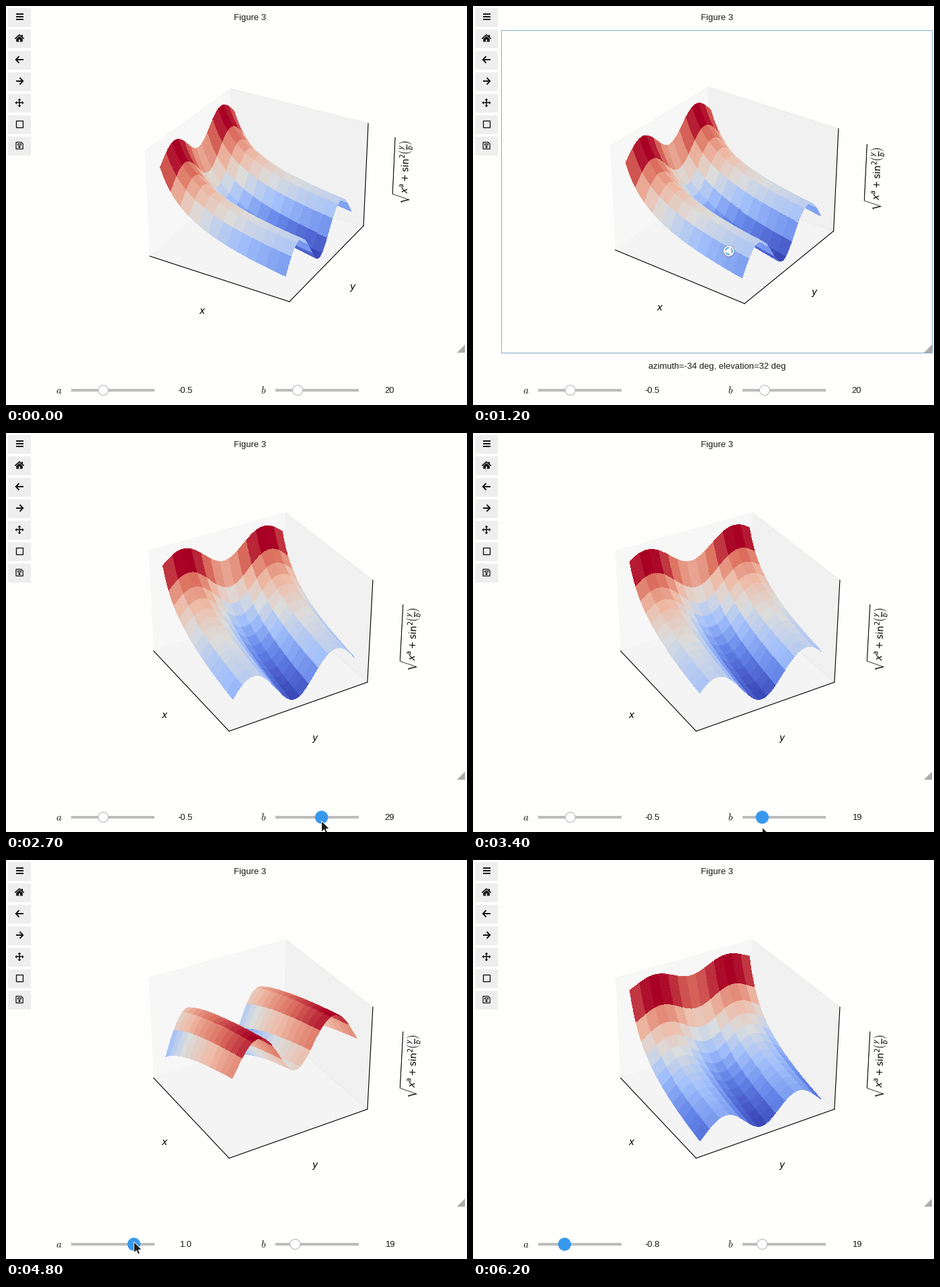
Animation of 686x595 px, one loop 6.6 s. Source, as a matplotlib script:

```python
import numpy as np
import matplotlib.pyplot as plt
from matplotlib.animation import FuncAnimation
from matplotlib.colors import LinearSegmentedColormap
from matplotlib.patches import Circle, Polygon, Rectangle
from matplotlib.transforms import Affine2D

W, H, DPI = 686, 595, 100
STEP, LOOP = 100, 6600
PX = 72 / DPI
INK, GRAY, BLUE = "#151515", "#bcbcbc", "#3898ec"
BLOCKS, FINE = 13, 3
PLOT_LAG, VIEW_LAG = 200, 350
COOLWARM = LinearSegmentedColormap.from_list(
    "warm", ["#3b48b8", "#6384e8", "#a2c0fb", "#dbdddd",
             "#eebba6", "#dd7462", "#a80024"])

fig = plt.figure(figsize=(W / DPI, H / DPI), dpi=DPI, facecolor="#fefefd")


# --- motion -----------------------------------------------------------

def linear(t, t0, t1):
    return np.clip((t - t0) / (t1 - t0), 0, 1)


def ease(t, t0, t1):
    s = linear(t, t0, t1)
    return s * s * (3 - 2 * s)


def a_at(t):
    return (-0.52 + 1.52 * ease(t, 4220, 4740)
            - 1.65 * ease(t, 5060, 5620) - 0.15 * ease(t, 5600, 6000))


def b_at(t):
    return 20 + 12 * ease(t, 2400, 2850) - 12.9 * ease(t, 2870, 3400)


def knob_a(t):
    return 160.3 + 30 * a_at(t)


def knob_b(t):
    return 434 + 4 * (b_at(t) - 20)


def view_at(t):
    """Azimuth and elevation produced by the mouse drag."""
    s = ease(t, 650, 1350) * 180 / 369.6
    return -60 + 60.5 * s, 30 + 5 * s


def cursor_at(t):
    if t < 2300:
        reach, drag = ease(t, 400, 600), ease(t, 650, 1350)
        back, leave = ease(t, 1400, 1700), ease(t, 1700, 2300)
        return (440 - 6 * reach - 60.5 * drag + 12.5 * back + 48 * leave,
                556 - 195 * reach + 5 * drag - 2 * back + 209 * leave)
    if t < 3850:
        away = linear(t, 3400, 3800)
        return knob_b(t) - 230 * away, 573 + 15 * linear(t, 2300, 3400) + 17 * away
    arrive = ease(t, 3800, 4100)
    return knob_a(t), 600 - 32 * arrive + 40 * linear(t, 4500, 6100) ** 2


# --- 3D plot inside a 640 x 480 canvas --------------------------------

ax = fig.add_axes([123 / W, 130.8 / H, 496 / W, 369.6 / H], projection="3d")
ax.patch.set_visible(False)
n = BLOCKS * FINE + 1
X, Y = np.meshgrid(np.linspace(0.1, 1, n), np.linspace(-50, 50, n))
ax.set(xticks=[], yticks=[], zticks=[], xlabel="$x$", ylabel="$y$",
       zlabel=r"$\sqrt{x^{a} + \mathrm{sin}^{2}{\left(\frac{y}{b}\right)}}$")


def padded(lo, hi, margin=0.0):
    lo, hi = lo - margin * (hi - lo), hi + margin * (hi - lo)
    d = (hi - lo) / 48
    return lo - d, hi + d


def block_colors(Z):
    """One colour per block of cells, from the mean height."""
    cells = (Z[1:, 1:] + Z[1:, :-1] + Z[:-1, 1:] + Z[:-1, :-1]) / 4
    mean = cells.reshape(BLOCKS, FINE, BLOCKS, FINE).mean(axis=(1, 3))
    mean = (mean - mean.min()) / np.ptp(mean)
    return COOLWARM(np.kron(mean, np.ones((FINE, FINE))))


surface = None


def draw_surface(a, b):
    global surface
    if surface is not None:
        surface.remove()
    Z = np.sqrt(X ** a + np.sin(Y / b) ** 2)
    surface = ax.plot_surface(X, Y, Z, rstride=1, cstride=1, shade=False,
                              facecolors=block_colors(Z), linewidth=0,
                              antialiased=False)
    ax.set_xlim(*padded(0.1, 1, 0.05))
    ax.set_ylim(*padded(-50, 50, 0.05))
    ax.set_zlim(*padded(Z.min(), Z.max()))


# --- overlay in pixel coordinates, y pointing down --------------------

ui = fig.add_axes([0, 0, 1, 1], zorder=5)
ui.set(xlim=(0, W), ylim=(H, 0))
ui.set_autoscale_on(False)
ui.axis("off")


def rect(x, y, w, h, fc=INK, ec="none", lw=0):
    return ui.add_patch(Rectangle((x, y), w, h, fc=fc, ec=ec, lw=lw * PX))


def poly(pts, fc=INK, ec="none", lw=0, **kw):
    return ui.add_patch(Polygon(pts, closed=True, fc=fc, ec=ec, lw=lw * PX, **kw))


def disc(x, y, r, fc=INK, ec="none", lw=0, **kw):
    return ui.add_patch(Circle((x, y), r, fc=fc, ec=ec, lw=lw * PX, **kw))


def line(pts, lw=2, color=INK, **kw):
    x, y = zip(*pts)
    return ui.plot(x, y, color=color, lw=lw * PX, solid_capstyle="butt",
                   solid_joinstyle="miter", **kw)[0]


def label(x, y, s, size=13, **kw):
    return ui.text(x, y, s, fontsize=size * PX, color="#1a1a1a", ha="center",
                   va="baseline", family="Liberation Sans", **kw)


def arrow_icon(cy, d):
    line([(20 - 5.5 * d, cy), (20 + 4.5 * d, cy)])
    line([(20 + 0.5 * d, cy - 5), (20 + 5.2 * d, cy), (20 + 0.5 * d, cy + 5)])


def home_icon(cy):
    line([(13.3, cy + 0.8), (20, cy - 5), (26.7, cy + 0.8)], 1.7)
    rect(23.3, cy - 5.2, 1.9, 4)
    poly([(15.2, cy + 1), (20, cy - 3), (24.8, cy + 1), (24.8, cy + 5.4),
          (15.2, cy + 5.4)])
    rect(18.7, cy + 2, 2.6, 3.4, fc="#eeeeee")


def pan_icon(cy):
    for k in range(4):
        turn = Affine2D().rotate_deg(90 * k).translate(20, cy) + ui.transData
        line([(0, 0), (5, 0)], 1.6, transform=turn)
        poly([(6.6, 0), (3.9, -2.6), (3.9, 2.6)], transform=turn)


def save_icon(cy):
    poly([(15, cy - 5), (22.6, cy - 5), (25.2, cy - 2.4), (25.2, cy + 5),
          (15, cy + 5)], fc="none", ec=INK, lw=1.3)
    rect(16.8, cy - 3.6, 5.4, 2.6, fc="none", ec=INK, lw=1)
    disc(20, cy + 2, 1.6)


for k in range(7):
    rect(3, 3 + 32 * k, 34, 28, fc="#eeeeee")
for k in range(3):
    rect(14.5, 11 + 4.2 * k, 11, 2)
home_icon(48)
arrow_icon(80, -1)
arrow_icon(112, 1)
pan_icon(144.3)
rect(15, 171.3, 10, 10, fc="none", ec=INK, lw=1.4)
save_icon(208.2)

label(363, 21, "Figure 3")
message = label(363, 541, "")
border = [rect(x, y, w, h, fc="#7db0cc") for x, y, w, h in
          ((42, 36, 642, 1), (42, 517, 642, 1), (42, 36, 1, 482), (683, 36, 1, 482))]
poly([(683, 505), (683, 517), (671, 517)], fc="#ababab")


class Slider:
    def __init__(self, x, name):
        label(x - 18, 577.5, f"${name}$", 15, math_fontfamily="cm")
        rect(x, 571, 124, 4, fc=GRAY)
        self.knob = disc(x, 573, 7.5, lw=1, zorder=3)
        self.value = label(x + 170, 577, "")

    def set(self, x, text, active):
        self.knob.set_center((x, 573))
        self.knob.set_radius(9.2 if active else 7.5)
        self.knob.set_facecolor(BLUE if active else "white")
        self.knob.set_edgecolor(BLUE if active else "#b4b4b4")
        self.value.set_text(text)


slider_a, slider_b = Slider(97, "a"), Slider(401, "b")

# Mouse pointers, drawn around their hot spot
shift = Affine2D()
at_mouse = dict(transform=shift + ui.transData, zorder=6)
pointer = poly([(0, 0), (0, 16.5), (3.8, 13), (6.3, 18.5), (9, 17.3),
                (6.6, 12), (11.7, 11.5)], "#1c1c1c", "white", 0.9, **at_mouse)
grip = [disc(0, 0.6, 9, "#00000022", **at_mouse),
        disc(0, 0, 8, "white", "#a5abb0", 1, **at_mouse)]
for k in range(3):
    ang = np.radians(np.linspace(0, 85, 12) + 120 * k - 50)
    grip.append(line(list(zip(5 * np.cos(ang), 5 * np.sin(ang))), 2,
                     "#5aa5d6", **at_mouse))


def update(i):
    t = i * STEP
    draw_surface(a_at(t - PLOT_LAG), b_at(t - PLOT_LAG))
    azim, elev = view_at(t - VIEW_LAG)
    ax.view_init(elev=elev, azim=azim)

    slider_a.set(knob_a(t), f"{round(a_at(t), 1) + 0:.1f}", t >= 4100)
    slider_b.set(knob_b(t), f"{b_at(t):.0f}", 2200 <= t < 3800)

    x, y = cursor_at(t)
    shift.clear().translate(x, y)
    shown, dragging = t >= 400, 700 <= t <= 1500
    pointer.set_visible(shown and not dragging)
    for part in grip:
        part.set_visible(dragging)

    hover = shown and y < 518
    for side in border:
        side.set_visible(hover)
    azim, elev = view_at(t)
    message.set_text(f"azimuth={azim:.0f} deg, elevation={elev:.0f} deg"
                     if hover and t >= 700 else "")
    return []


anim = FuncAnimation(fig, update, frames=LOOP // STEP, interval=STEP,
                     repeat=True, repeat_delay=0, blit=False)
plt.show()
```
